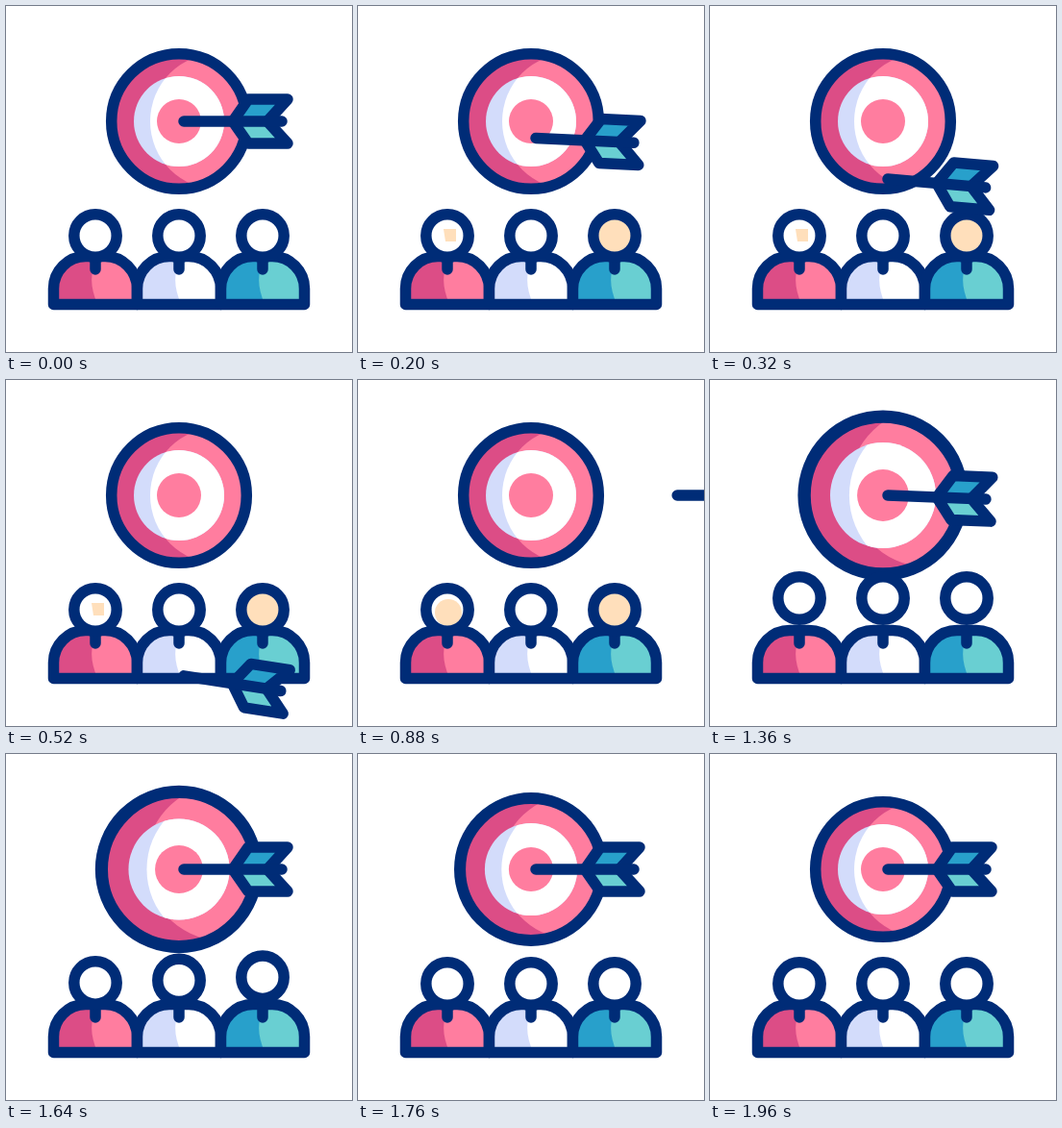
An HTML page with a canvas for the animation above (2000 ms loop, 360x360 px).

```html
<!DOCTYPE html>
<html lang="en">
<head>
<meta charset="utf-8">
<title>Team target</title>
<style>
  html, body { margin: 0; height: 100%; overflow: hidden; background: #fff; }
  canvas { display: block; width: 100vmin; height: 100vmin; }
</style>
</head>
<body>
<canvas id="stage" width="360" height="360"></canvas>
<script>
const ctx = document.getElementById('stage').getContext('2d');
const LOOP = 2000, STEP = 40;
const NAVY = '#002c77', PINK = '#ff7d9f', ROSE = '#dc4d86', LILAC = '#d3dcfb',
      BLUE = '#28a0cb', AQUA = '#69cfd2', SKIN = '#ffdfbb';

const clamp = x => Math.min(1, Math.max(0, x));
const smooth = x => { x = clamp(x); return x * x * (3 - 2 * x); };
// Rises from 0 to 1 after `up`, falls back after `down`.
const pulse = (t, up, down, length) => smooth((t - up) / length) - smooth((t - down) / length);

function keyframes(t, keys) {
  const i = keys.findIndex(([time]) => time > t);
  if (i < 1) return 0;
  const [t0, a] = keys[i - 1], [t1, b] = keys[i];
  return a + (b - a) * smooth((t - t0) / (t1 - t0));
}

function at(x, y, draw, scale = 1, angle = 0) {
  ctx.save();
  ctx.translate(x, y);
  ctx.rotate(angle * Math.PI / 180);
  ctx.scale(scale, scale);
  draw();
  ctx.restore();
}

function circle(x, y, r, fill) {
  const path = new Path2D();
  path.arc(x, y, r, 0, 2 * Math.PI);
  if (fill) { ctx.fillStyle = fill; ctx.fill(path); }
  return path;
}

function shape(d, fill) {
  const path = new Path2D(d);
  if (fill) { ctx.fillStyle = fill; ctx.fill(path); }
  return path;
}

function shadedDisc(r, dark, light) {
  ctx.clip(circle(0, 0, r, dark));
  circle(41, 0, 71, light);
}

function target(t) {
  const grow = i => pulse(t, 1010 + 40 * i, 1490 + 40 * i, 300);
  const outer = grow(2);
  at(180, 120, () => shadedDisc(70.3, ROSE, PINK), 1 + 0.17 * outer, -10 * outer);
  at(180, 120, () => ctx.stroke(circle(0, 0, 70.3)), 1 + 0.17 * outer);
  at(180, 120, () => shadedDisc(47, LILAC, '#fff'), 1 + 0.17 * grow(1));
  at(180, 120, () => circle(0, 0, 23, PINK), 1 + 0.17 * grow(0));
}

function person(t, i, dark, light) {
  const body = 'M-43.5 310.5V294A33.5 33.5 0 0 1-10 260.5H10A33.5 33.5 0 0 1 43.5 294V310.5Z';
  const lift = 12 * pulse(t, 1025 + 40 * i, 1460 + 40 * i, 220);
  at(93 + 87 * i, 0, () => {
    const outline = shape(body, dark);
    ctx.save();
    ctx.clip(outline);
    shape('M0 255V268Q-9 286 3 312H50V255Z', light);
    ctx.restore();
    ctx.stroke(outline);
    ctx.stroke(shape('M0 262V274'));
    const head = circle(0, 239 - lift, 22.2, '#fff');
    if (t >= 200 && t < 920) {
      if (i === 2) circle(0, 239, 17, SKIN);
      if (i === 0) t < 600 ? shape('M-4 232H9V245H-2Z', SKIN) : circle(1, 242, 14, SKIN);
    }
    ctx.stroke(head);
  });
}

function arrow(t) {
  let x = 185, y = 120, angle = 0;
  if (t < 840) {
    const fall = Math.max(0, t - 60) / 260;
    y += 60 * fall * fall;
    angle = 5 * fall;
  } else {
    x += 184 * clamp((1040 - t) / 200);
    angle = keyframes(t, [[1040, 0], [1080, -9], [1160, 7.8], [1240, -6], [1320, 4.4], [1400, 0]]);
  }
  if (t >= 600 && t < 880) return;
  at(x, y, () => {
    shape('M51 0L67-23H108L87 0Z', BLUE);
    shape('M51 0L67 23H108L87 0Z', AQUA);
    ctx.stroke(shape('M51 0L67-23H108L87 0L108 23H67Z'));
    ctx.stroke(shape('M0 0H102'));
  }, 1, angle);
}

function render(now) {
  const t = Math.floor(now % LOOP / STEP) * STEP;
  ctx.fillStyle = '#fff';
  ctx.fillRect(0, 0, 360, 360);
  ctx.strokeStyle = NAVY;
  ctx.lineWidth = 11.5;
  ctx.lineCap = ctx.lineJoin = 'round';
  target(t);
  [[ROSE, PINK], [LILAC, '#fff'], [BLUE, AQUA]].forEach((tones, i) => person(t, i, ...tones));
  arrow(t);
}

const start = performance.now();
function tick() {
  render(performance.now() - start);
  requestAnimationFrame(tick);
}
tick();
</script>
</body>
</html>
```
